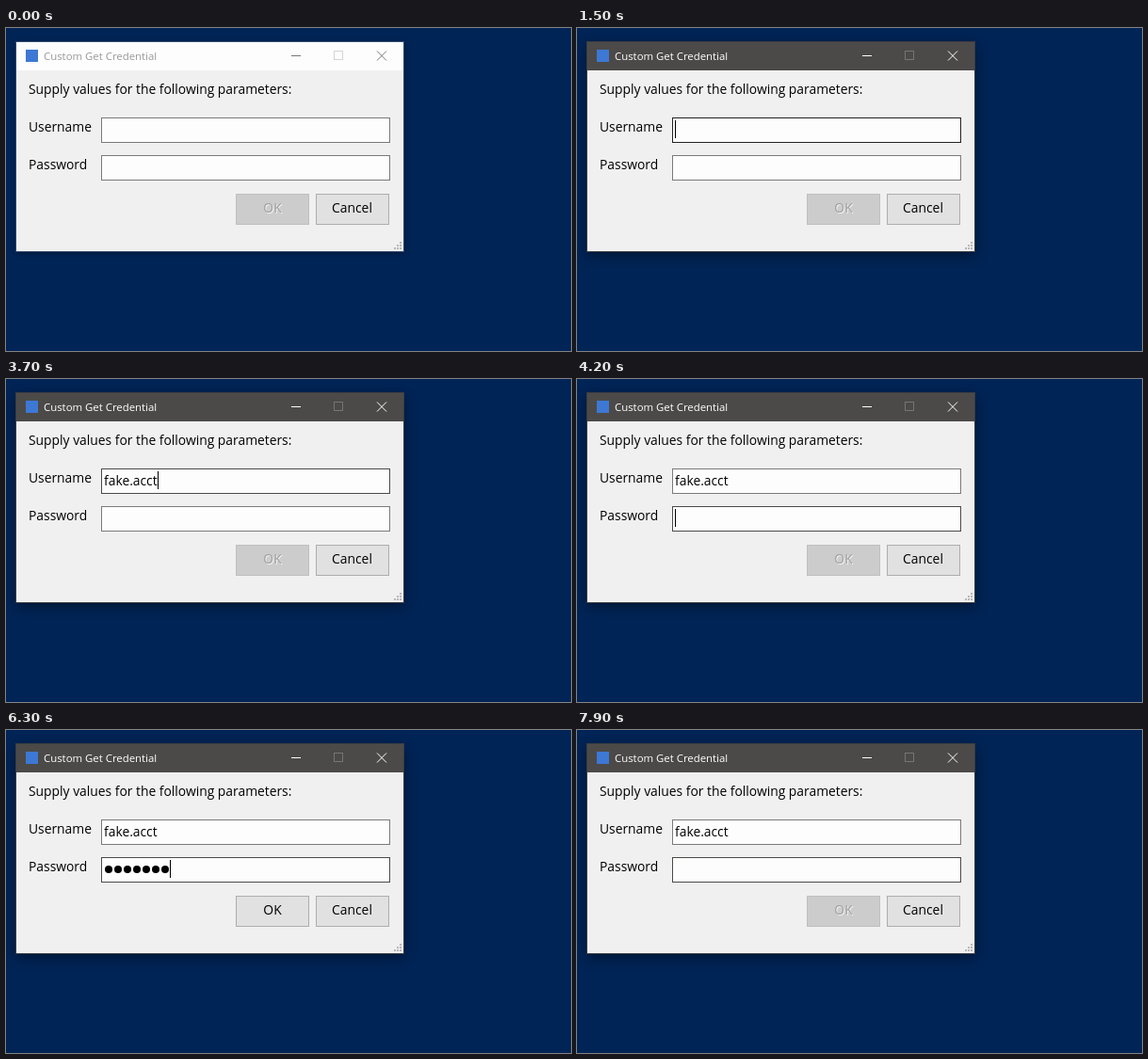
An HTML page that plays this animation: 600 by 343 pixels, repeating every 8000 ms.

```html
<!DOCTYPE html>
<html lang="en">
<head>
<meta charset="utf-8">
<title>Credential dialog</title>
<style>
  html, body { margin: 0; width: 100%; height: 100%; overflow: hidden; background: #012456; }
  svg { display: block; width: 600px; height: 343px; }
  text { font: 13.85px "Open Sans", "Noto Sans", sans-serif; fill: #000; white-space: pre; }
  #title { font-size: 11.4px; }
  .mid { text-anchor: middle; }
  .crisp { shape-rendering: crispEdges; }
  .field { fill: #fdfdfd; }
  .button { fill: #e1e1e1; stroke: #adadad; }
</style>
</head>
<body>
<svg viewBox="0 0 600 343">
  <rect width="600" height="343" fill="#012456"/>
  <rect id="shadow" x="11" y="15" width="411" height="222"/>
  <g class="crisp">
    <rect id="frame" x="10" y="14" width="413" height="224"/>
    <rect x="11" y="45" width="411" height="192" fill="#f0f0f0"/>
    <rect id="bar" x="11" y="15" width="411" height="30"/>
    <rect x="21" y="23" width="13" height="13" fill="#3c78d4"/>
  </g>
  <text id="title" x="40" y="34">Custom Get Credential</text>
  <g fill="none">
    <path id="min" class="crisp" d="M303 29.5h10"/>
    <rect id="max" class="crisp" x="348.5" y="24.5" width="9" height="9"/>
    <path id="close" d="M394 24.5l10 10m0-10l-10 10"/>
  </g>

  <text x="24" y="70">Supply values for the following parameters:</text>
  <text x="24" y="110">Username</text>
  <text x="24" y="150">Password</text>
  <g class="crisp">
    <rect id="userBox" class="field" x="101.5" y="95.5" width="306" height="26"/>
    <rect id="passBox" class="field" x="101.5" y="135.5" width="306" height="26"/>
    <rect id="okBox" class="button" x="244.5" y="176.5" width="77" height="32"/>
    <rect class="button" x="329.5" y="176.5" width="77" height="32"/>
  </g>
  <text id="user" x="104" y="113"></text>
  <g id="dots"></g>
  <text id="okGlow" class="mid" x="284" y="197" style="fill:#f4f4f4">OK</text>
  <text id="ok" class="mid" x="283" y="196">OK</text>
  <text class="mid" x="367.5" y="196">Cancel</text>
  <g id="grip" class="crisp" fill="#b8b8b8"></g>
  <rect id="caret" class="crisp" width="1" height="19"/>
</svg>
<script>
const LOOP = 8000;
const LOGIN = "fake.acct";
const REST = "#7a7a7a", HOT = "#171717", FOCUS = "#4c4a48";
const keyTimes = [2100, 2600, 2700, 2800, 3100, 3300, 3400, 3600, 3700];

// [start time, value] pairs; each value holds until the next start
const userBorder = [
  [0, REST], [200, "#484848"], [400, HOT], [500, "#484848"], [700, "#696969"], [800, REST],
  [1500, "#222222"], [1600, "#383736"], [1700, FOCUS],
  [4000, "#5b5a59"], [4100, "#6b6a69"], [4200, REST]
];
const passBorder = [[0, REST], [4000, "#6b6a69"], [4100, "#5b5a59"], [4200, FOCUS]];
const dotCount = [
  [0, 0], [4500, 1], [4800, 2], [4900, 3], [5000, 4], [5100, 5], [5200, 6], [5300, 7], [5500, 10],
  [5900, 9], [6100, 8], [6300, 7], [6400, 6], [6600, 5], [6700, 4], [6900, 3], [7000, 2],
  [7200, 1], [7400, 0]
];

const el = id => document.getElementById(id);
const hold = (steps, t) => steps.filter(s => s[0] <= t).pop()[1];
const paint = (id, prop, color) => el(id).setAttribute(prop, color);

function add(parent, tag, attrs) {
  const node = document.createElementNS("http://www.w3.org/2000/svg", tag);
  for (const key in attrs) node.setAttribute(key, attrs[key]);
  el(parent).appendChild(node);
}

for (let i = 0; i < 10; i++) add("dots", "circle", { cx: 109 + i * 10, cy: 148, r: 4 });
for (let row = 0; row < 3; row++)
  for (let col = 2 - row; col < 3; col++)
    add("grip", "rect", { x: 412 + col * 3, y: 227 + row * 3, width: 2, height: 2 });

function drawWindow(active) {
  paint("frame", "fill", active ? "#3b3d42" : "#31486c");
  paint("bar", "fill", active ? "#4c4a48" : "#fdfdfd");
  el("title").style.fill = active ? "#fff" : "#999";
  paint("min", "stroke", active ? "#fff" : "#777");
  paint("close", "stroke", active ? "#fff" : "#777");
  paint("max", "stroke", active ? "#777573" : "#d4d4d4");
  el("shadow").style.filter = active
    ? "drop-shadow(0 4px 7px rgba(0,0,0,.45))"
    : "drop-shadow(0 2px 3px rgba(0,0,0,.4))";
}

function drawOk(enabled) {
  el("okBox").style.fill = enabled ? "#e1e1e1" : "#cccccc";
  el("okBox").style.stroke = enabled ? "#adadad" : "#bfbfbf";
  el("ok").style.fill = enabled ? "#000" : "#a0a0a0";
  el("okGlow").style.display = enabled ? "none" : "";
}

function draw(t) {
  const typed = keyTimes.filter(k => k <= t).length;
  const dots = hold(dotCount, t);
  const inPassword = t >= 4000;
  const user = el("user");

  drawWindow(t >= 1500);
  drawOk(dots > 0);
  paint("userBox", "stroke", hold(userBorder, t));
  paint("passBox", "stroke", hold(passBorder, t));
  user.textContent = LOGIN.slice(0, typed);
  [...el("dots").children].forEach((dot, i) => { dot.style.display = i < dots ? "" : "none"; });

  const typedWidth = typed ? Math.round(user.getComputedTextLength()) : 0;
  const caret = el("caret");
  caret.setAttribute("x", 104 + (inPassword ? dots * 10 : typedWidth));
  caret.setAttribute("y", inPassword ? 138 : 98);
  caret.style.display = t >= 1500 && t < 7900 ? "" : "none";
}

const start = performance.now();
function tick() {
  draw((performance.now() - start) % LOOP);
  requestAnimationFrame(tick);
}
tick();
</script>
</body>
</html>
```
